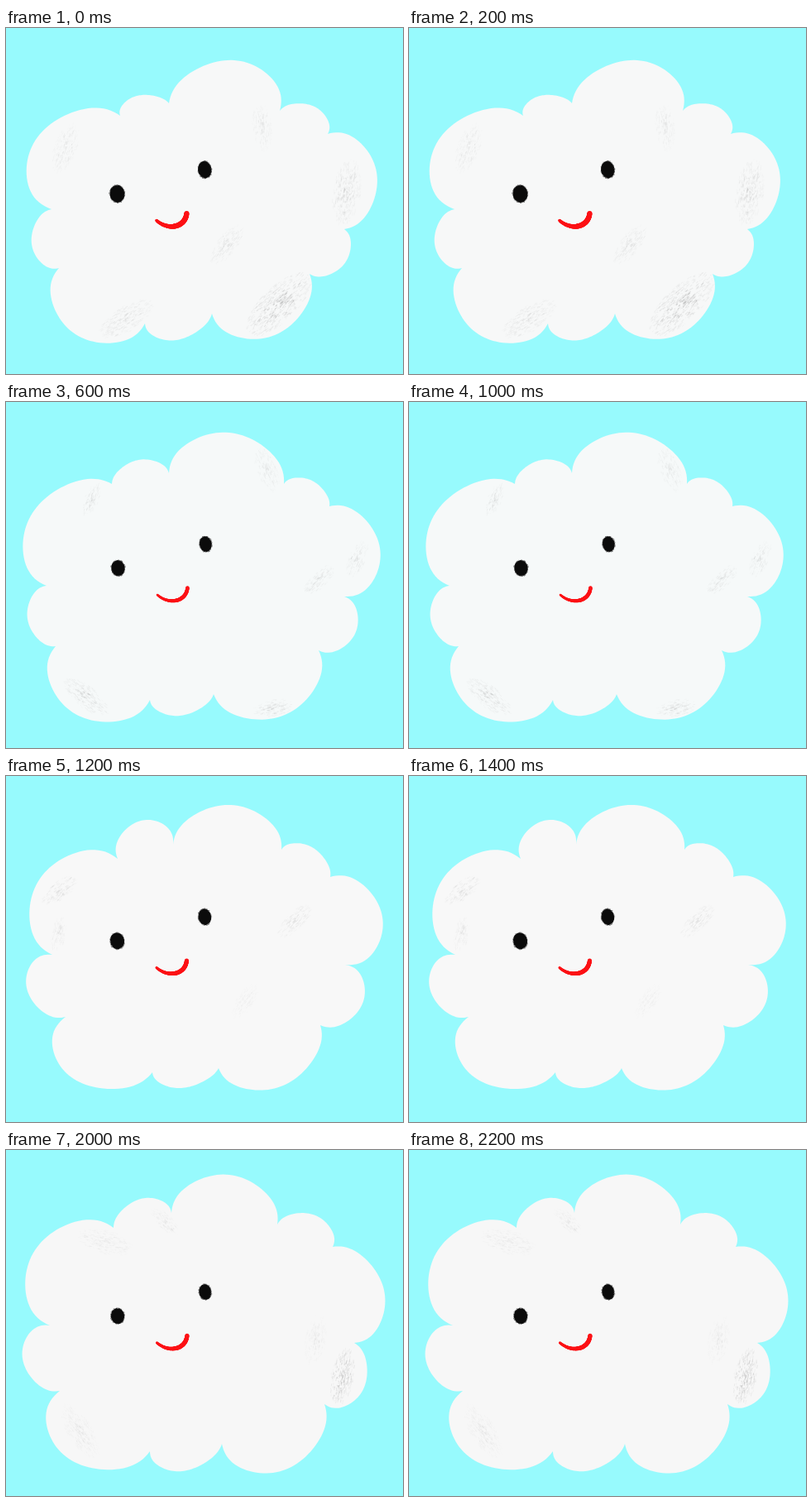
Animation, 480 px wide and 418 px high, one loop 2.4 s. Source, as an HTML page with a canvas:

```html
<!DOCTYPE html>
<html lang="en">
<head>
<meta charset="utf-8">
<title>Smiling cloud</title>
<style>
html, body { margin: 0; width: 100%; height: 100%; overflow: hidden; background: #97fafd; }
canvas { display: block; width: 100%; height: 100%; }
</style>
</head>
<body>
<canvas id="stage" width="480" height="418"></canvas>
<script>
const ctx = document.getElementById('stage').getContext('2d');
const HOLD = 600, PLUMP = .06, TAU = Math.PI * 2;

// puffs: "corner apex" for each puff, clockwise.
// chalk: x, y, half length, tilt from upright, strength.
// face: shift x, shift y, eye scale, lip width.
const poses = [
  {
    tone: '#f7f8f8', face: [0, 0, 1.04, 6],
    puffs: `55,219 38,132 / 138,106 158,82 / 197,91 276,39 / 331,100 373,95 / 389,128 448,174 /
      409,243 409,285 / 367,297 325,371 / 249,345 206,377 / 168,357 84,370 / 64,290 31,261`,
    chalk: [[72, 143, 32, .35, .35], [309, 118, 28, -.1, .35], [412, 197, 40, .15, .6],
      [268, 260, 28, .65, .5], [331, 332, 50, .8, .9], [147, 350, 36, 1, .5]]
  },
  {
    tone: '#f6f9f9', face: [1, .5, .95, 4.4],
    puffs: `49,222 32,134 / 128,99 160,70 / 197,86 270,37 / 336,99 370,95 / 391,126 452,176 /
      409,235 422,280 / 378,300 337,378 / 251,353 210,379 / 174,360 84,377 / 60,295 26,262`,
    chalk: [[104, 116, 20, .4, .6], [314, 80, 28, -.4, .35], [380, 213, 23, .8, .5],
      [425, 188, 24, .4, .4], [95, 355, 32, -.9, .6], [325, 369, 24, 1.4, .6]]
  },
  {
    tone: '#f8f8f8', face: [0, -1, .99, 5],
    puffs: `56,216 41,124 / 135,100 163,54 / 202,83 272,35 / 333,89 370,86 / 392,122 455,170 /
      410,228 431,275 / 380,301 335,374 / 257,353 212,377 / 177,358 82,366 / 72,291 25,256`,
    chalk: [[66, 137, 25, .9, .6], [63, 190, 21, .2, .4], [350, 173, 26, .8, .5], [290, 270, 24, .6, .25]]
  },
  {
    tone: '#f7f7f7', face: [.5, .3, .95, 5],
    puffs: `53,212 35,121 / 130,94 163,59 / 200,76 270,30 / 328,90 374,79 / 395,117 457,169 /
      421,233 432,289 / 385,307 338,386 / 261,355 213,388 / 174,364 76,373 / 65,291 20,252`,
    chalk: [[118, 111, 34, -1.3, .3], [191, 86, 22, -.8, .35], [374, 228, 30, .15, .25],
      [407, 272, 34, .2, 1.1], [88, 338, 36, -.55, .3]]
  }
];

function random(seed) {
  return () => {
    seed = (seed * 1664525 + 1013904223) >>> 0;
    return seed / 4294967296;
  };
}

// A circular arc on the chord from p to q, leaned so that its top meets the apex.
function addPuff(path, p, apex, q) {
  const c = Math.hypot(q[0] - p[0], q[1] - p[1]);
  const tx = (q[0] - p[0]) / c, ty = (q[1] - p[1]) / c;
  const ax = apex[0] - p[0], ay = apex[1] - p[1];
  const h = ax * ty - ay * tx;
  const lean = ax * tx + ay * ty - c / 2;
  const r = (c * c / 4 + h * h) / (2 * h);
  const half = Math.atan2(c / 2, r - h);
  for (let i = 0; i <= 48; i++) {
    const a = half * (i / 24 - 1);
    const up = h - r + r * Math.cos(a), rise = up / h;
    const along = c / 2 + r * Math.sin(a) * (1 + PLUMP * Math.sin(Math.PI * rise)) + lean * rise;
    path.lineTo(p[0] + along * tx + up * ty, p[1] + along * ty - up * tx);
  }
}

function cloudPath(text) {
  const puffs = text.split('/').map(puff => puff.trim().split(' ').map(p => p.split(',').map(Number)));
  const path = new Path2D();
  puffs.forEach(([corner, apex], i) => addPuff(path, corner, apex, puffs[(i + 1) % puffs.length][0]));
  path.closePath();
  return path;
}

for (const pose of poses) pose.path = cloudPath(pose.puffs);

// Dry chalk: short faint strokes, thinning towards the rim of the patch.
function drawChalk([x, y, length, tilt, strength], rnd) {
  const width = length * .42;
  ctx.save();
  ctx.translate(x, y);
  ctx.rotate(tilt);
  for (let i = 0; i < length * width * .55; i++) {
    const a = rnd() * TAU, r = Math.pow(rnd(), .6);
    ctx.fillStyle = `rgba(135,135,135,${strength * (.08 + .22 * rnd()) * (1.1 - r * .8)})`;
    ctx.fillRect(Math.cos(a) * r * width, Math.sin(a) * r * length, .9, 1 + 4 * rnd());
  }
  ctx.restore();
}

function drawEye(x, y, rx, ry, rnd) {
  ctx.save();
  ctx.translate(x, y);
  ctx.rotate(-.15);
  ctx.fillStyle = '#0b0b0b';
  ctx.beginPath();
  ctx.ellipse(0, 0, rx - .4, ry - .4, 0, 0, TAU);
  ctx.fill();
  for (let i = 0; i < 60; i++) {
    const a = rnd() * TAU, r = .9 + rnd() * .12;
    ctx.fillStyle = i % 2 ? 'rgba(60,60,60,.6)' : 'rgba(150,150,150,.5)';
    ctx.fillRect(Math.cos(a) * rx * r - .5, Math.sin(a) * ry * r - .5, 1, 1);
  }
  ctx.restore();
}

function bezier(a, b, c, d, t) {
  const u = 1 - t;
  return u * u * u * a + 3 * u * u * t * b + 3 * u * t * t * c + t * t * t * d;
}

// The smile swells from its thin left end to the right.
function drawMouth(dx, dy, width) {
  ctx.fillStyle = '#fc1216';
  for (let t = 0; t <= 1; t += .01) {
    const x = bezier(182, 196, 217, 218.5, t), y = bezier(232.5, 245, 241, 223.5, t);
    ctx.beginPath();
    ctx.arc(x + dx, y + dy, width * (.3 + .2 * Math.min(1, t * 2)), 0, TAU);
    ctx.fill();
  }
}

function draw(index) {
  const pose = poses[index], rnd = random(97 * index + 5);
  const [dx, dy, size, lip] = pose.face;
  ctx.fillStyle = '#97fafd';
  ctx.fillRect(0, 0, 480, 418);
  ctx.fillStyle = pose.tone;
  ctx.fill(pose.path);
  ctx.save();
  ctx.clip(pose.path);
  for (const patch of pose.chalk) drawChalk(patch, rnd);
  ctx.restore();
  drawEye(134.5 + dx, 200.3 + dy, 9.2 * size, 10.7 * size, rnd);
  drawEye(240.3 + dx, 171.2 + dy, 8.4 * size, 10.5 * size, rnd);
  drawMouth(dx, dy, lip);
}

const start = performance.now();
let shown = -1;
function tick() {
  const time = Math.max(0, performance.now() - start);
  const index = Math.floor(time / HOLD) % poses.length;
  if (index !== shown) draw(shown = index);
  requestAnimationFrame(tick);
}
tick();
</script>
</body>
</html>
```
